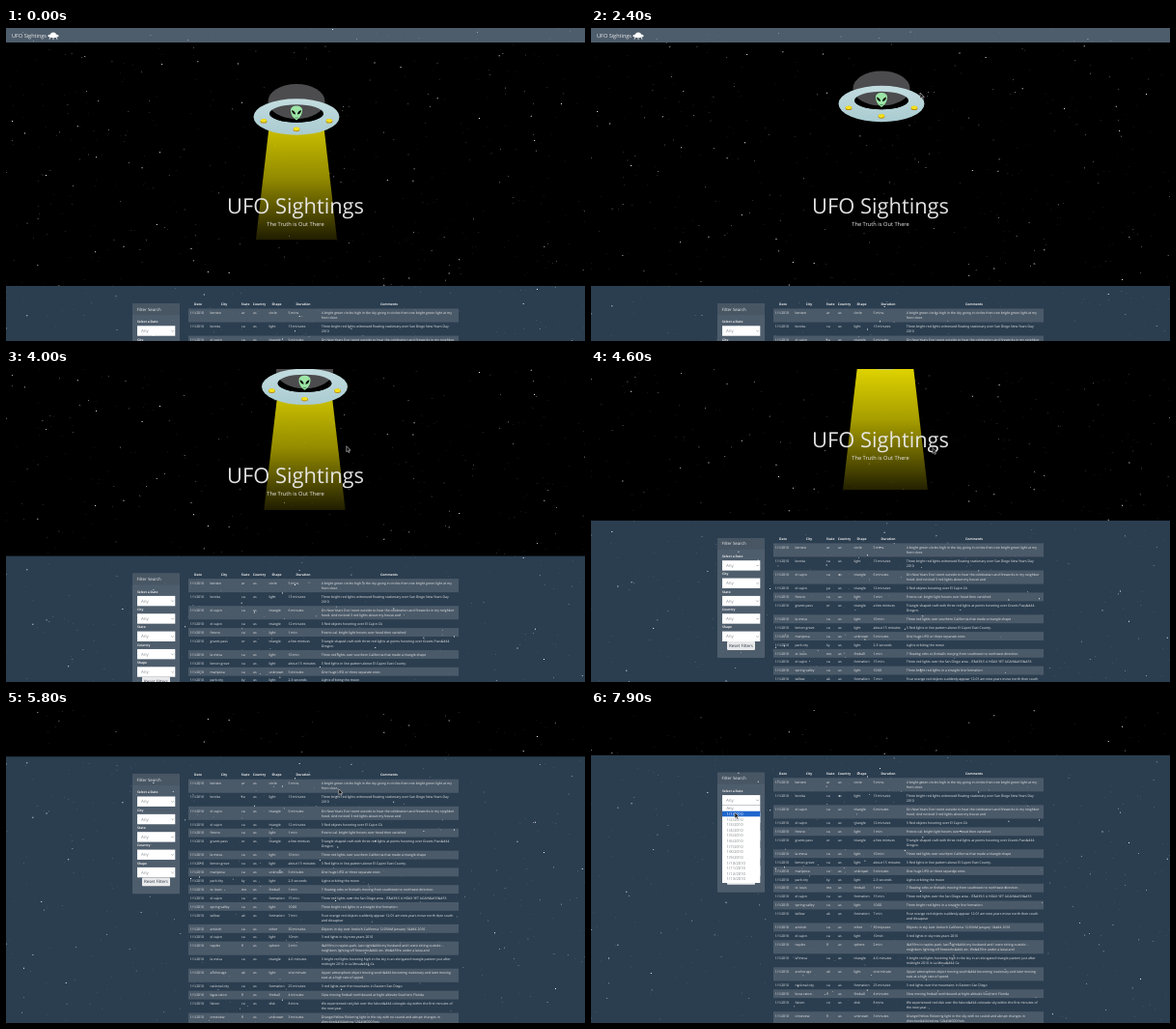
Animation of 600 by 324 pixels, one loop 8000 ms. Source, as an HTML page:

```html
<!DOCTYPE html>
<html lang="en">
<head>
<meta charset="utf-8">
<title>UFO Sightings</title>
<style>
html, body { margin: 0; width: 100%; height: 100%; overflow: hidden; background: #2b3e50; }
svg { display: block; width: 100vw; height: 100vh; }
text { font-family: "Open Sans", "Noto Sans", sans-serif; fill: #ebebeb; text-rendering: geometricPrecision; white-space: pre; }
</style>
</head>
<body>
<svg id="stage" viewBox="0 0 600 324" xmlns="http://www.w3.org/2000/svg">
  <defs>
    <linearGradient id="glow" x1="0" y1="0" x2="0" y2="1">
      <stop offset="0" stop-color="#e6da00"/>
      <stop offset=".45" stop-color="#b0a600" stop-opacity=".95"/>
      <stop offset="1" stop-color="#b0a400" stop-opacity=".2"/>
    </linearGradient>
    <linearGradient id="metal" x1="0" y1="0" x2="0" y2="1">
      <stop offset="0" stop-color="#c3dde0"/>
      <stop offset="1" stop-color="#a9cbd0"/>
    </linearGradient>
  </defs>
  <g id="page">
    <rect y="15" width="600" height="252"/>
    <g id="nav">
      <rect width="600" height="15" fill="#4e5d6c"/>
      <text x="6" y="10" font-size="5.55">UFO Sightings</text>
      <g fill="#fff">
        <ellipse cx="49" cy="8.2" rx="5.6" ry="1.9"/>
        <path d="M46 7a3 2.6 0 0 1 6 0z"/>
        <path d="M46 9.5l-1 2.2M49 10v2.2M52 9.5l1 2.2" stroke="#fff" stroke-width=".8"/>
      </g>
    </g>
    <g id="table"></g>
    <g id="filters"></g>
    <g id="stars" fill="#fff"></g>
    <path id="beam" fill="url(#glow)"/>
    <g id="ufo">
      <ellipse cy="-3.5" rx="28" ry="9.2"/>
      <ellipse cy="-16" rx="29.5" ry="18" fill="#4c4c4e"/>
      <path fill="url(#metal)" fill-rule="evenodd"
        d="M-44.5 0a44.5 18.7 0 1 1 89 0a44.5 18.7 0 1 1-89 0zM-28-3.5a28 9.2 0 1 0 56 0a28 9.2 0 1 0-56 0z"/>
      <path d="M-28-3.5a28 9.2 0 0 0 56 0q-7 5.5-28 5.5t-28-5.5z"/>
      <g id="alien">
        <path d="M0 3.4C-4.5 1-6.2-4-6-7.4C-5.6-13 5.6-13 6-7.4C6.2-4 4.5 1 0 3.4z" fill="#9ce5a6"/>
        <path d="M-4.9-7q3.8 1 3.9 4.6q-3.6-.6-3.9-4.6zM4.9-7q-3.8 1-3.9 4.6q3.6-.6 3.9-4.6z"/>
        <path d="M-1.6 1h3.2" stroke="#245c30" stroke-width=".6"/>
      </g>
      <g id="lights"></g>
    </g>
    <g text-anchor="middle">
      <text x="300" y="191.5" font-size="21.9" opacity=".96">UFO Sightings</text>
      <text x="300" y="204.6" font-size="5.73">The Truth is Out There</text>
    </g>
    <g id="menu"></g>
  </g>
  <path id="cursor" d="M0 0v6l1.4-1.2 1 2.1 1-.5-1-2h1.9z" fill="#111" stroke="#ddd" stroke-width=".55"/>
</svg>
<script>
const $ = id => document.getElementById(id);
const LOOP = 8000;

function add(parent, tag, attrs, text) {
  const el = document.createElementNS('http://www.w3.org/2000/svg', tag);
  for (const key in attrs) el.setAttribute(key, attrs[key]);
  if (text !== undefined) el.textContent = text;
  parent.append(el);
  return el;
}
const rect = (parent, x, y, width, height, fill, rx = 0) =>
  add(parent, 'rect', { x, y, width, height, fill, rx });
// y is the vertical middle of the lowercase letters
const label = (parent, x, y, size, text, more) =>
  add(parent, 'text', { x, y: y + size * .35, 'font-size': size, ...more }, text);

// city|state|shape|duration|comment line|second comment line
const sightings = `benton|ar|circle|5 mins.|4 bright green circles high in the sky going in circles then one bright green light at my|front door.
bonita|ca|light|13 minutes|Three bright red lights witnessed floating stationary over San Diego New Years Day|2010
el cajon|ca|triangle|6 minutes|On New Years Eve I went outside to hear the celebration and fireworks in my neighbor|hood. And noticed 3 red lights above my house and
el cajon|ca|triangle|12 minutes|3 Red objects hovering over El Cajon CA
fresno|ca|light|1 min|Fresno cal. bright light hovers over head then vanished
grants pass|or|triangle|a few mintues|Triangle shaped craft with three red lights at points hovering over Grants Pass&#44|Oregon.
la mesa|ca|light|10 min|Three red lights over southern California that made a triangle shape
lemon grove|ca|light|about 15 minutes|3 Red lights in line pattern above El Cajon/ East County.
mariposa|ca|unknown|5 minutes|One huge UFO or three separate ones
park city|ky|light|2-3 seconds|Lights orbiting the moon
st. louis|mo|fireball|1 min|7 floating orbs or fireballs moving from southwest to northeast direction.
el cajon|ca|formation|15 min.|Three red lights over the San Diego area - IT&#39;S A HOAX YET AGAIN&#33&#33
spring valley|ca|light|10:00|Three bright red lights in a straight line formation
willow|ak|formation|7 min|Four orange red objects suddenly appear 12:01 am new years move north then south|and dissapear
antioch|ca|other|30 minutes|Objects in sky over Antioch California 12:03AM January 1&#44 2010
el cajon|ca|light|10min|3 red lights in sky new years 2010
naples|fl|sphere|2 min|I&#39m in naples park- last night&#44 my husband and I were sitting outside --|neighbors lighting off fireworks&#44 etc. We&#39re under a lanai and
la mesa|ca|triangle|4-6 minutes|3 bright red lights hovering high in the sky in an elongated triangle pattern just after|midnight 2010 in La Mesa&#44 Ca
anchorage|ak|light|one minute|Upper atmosphere object moving south&#44 becoming stationary and later moving|east at a high rate of speed.
national city|ca|formation|25 minutes|3 red lights over the mountains in Eastern San Diego
boca raton|fl|fireball|4 minutes|Slow moving fireball northbound at hight altitude Southern Florida
falcon|co|disk|8 mins|We experienced red disk over the falcon&#44 colorado sky within the first minutes of|the new year.
crestview|fl|unknown|3 minutes|Orange/Yellow flickering light in the sky with no sound and abrupt changes in|direction&#44 below 12&#44000 feet.`;

function buildTable() {
  const table = $('table');
  const heads = { Date: 199, City: 226, State: 248, Country: 262.5, Shape: 280.5, Duration: 308, Comments: 397 };
  for (const name in heads)
    label(table, heads[name], 286, 3.35, name, { 'text-anchor': 'middle', 'font-weight': 700 });
  let top = 290.5;
  sightings.split('\n').forEach((line, i) => {
    const [city, state, shape, duration, comment, rest] = line.split('|');
    const height = rest ? 14.05 : 8.88;
    if (i % 2 === 0) rect(table, 189, top, 280, height, '#4b5a69');
    const cells = { 190.7: '1/1/2010', 211.5: city, 244: state, 256: 'us', 272.5: shape, 292.5: duration, 326.8: comment };
    for (const x in cells) label(table, +x, top + 4.5, 3.45, cells[x]);
    if (rest) label(table, 326.8, top + 9.5, 3.45, rest);
    top += height;
  });
}

function buildFilters() {
  const box = $('filters');
  rect(box, 131, 285, 49, 124, '#4e5d6c', .8);
  rect(box, 131, 285, 49, 12, '#485664', .8);
  label(box, 135.5, 291, 4.4, 'Filter Search');
  ['Select a Date', 'City', 'State', 'Country', 'Shape'].forEach((name, i) => {
    const y = 304 + i * 18.35;
    label(box, 136, y, 3.3, name, { 'font-weight': 700 });
    rect(box, 136, y + 4.3, 39.3, 10.4, '#fff');
    label(box, 140, y + 9.6, 4.5, 'Any', { style: 'fill:#8b8f94' });
    add(box, 'path', { d: `M171.4 ${y + 9}l1.2 1.2 1.2-1.2`, fill: 'none', stroke: '#666', 'stroke-width': .5 });
  });
  rect(box, 141, 392.2, 29, 8.8, '#e9eaec', .8);
  label(box, 155.5, 396.6, 4.4, 'Reset Filters', { 'text-anchor': 'middle', style: 'fill:#2b3440' });
}

const MENU_TOP = 318.9, ITEM = 5.62;
let menuBar, menuItems;
function buildMenu() {
  const menu = $('menu');
  rect(menu, 136, MENU_TOP, 39.3, ITEM * 14 + 1.6, '#fff');
  menuBar = rect(menu, 136, MENU_TOP, 39.3, ITEM, '#1f66cc');
  menuItems = Array.from({ length: 14 }, (_, i) =>
    label(menu, 140.5, MENU_TOP + ITEM * (i + .5) + .4, 4.1, i ? `1/${i}/2010` : 'Any'));
}

let seed = 11;
const random = () => (seed = seed * 16807 % 2147483647) / 2147483647;
const TILE = 625;
let starLayers;
function buildStars() {
  const specs = [[700, .31, 12.5], [200, .62, 6.25], [100, .94, 4.17]];
  starLayers = specs.map(([count, size, speed]) => {
    let d = '';
    for (let i = 0; i < count; i++)
      d += `M${(random() * TILE).toFixed(1)} ${(random() * TILE).toFixed(1)}h${size}v${size}h-${size}z`;
    const layer = add($('stars'), 'g', {});
    add(layer, 'path', { d });
    add(layer, 'path', { d, transform: `translate(0 ${TILE})` });
    return { layer, speed };
  });
}

function buildLights() {
  for (const [x, y] of [[-34, 3.8], [0, 12.4], [34, 3.8]]) {
    add($('lights'), 'ellipse', { cx: x, cy: y + .6, rx: 3.4, ry: 2.2, fill: '#b58a14' });
    add($('lights'), 'ellipse', { cx: x, cy: y, rx: 3.1, ry: 1.8, fill: '#f4e11c' });
  }
}

const clamp = u => Math.max(0, Math.min(1, u));
const smooth = u => u * u * (3 - 2 * u);
// keys: [time, ...values], eased between neighbours
function track(keys, t) {
  const next = keys.findIndex(key => key[0] > t);
  if (next < 0) return keys[keys.length - 1].slice(1);
  if (next === 0) return keys[0].slice(1);
  const a = keys[next - 1], b = keys[next];
  const u = smooth((t - a[0]) / (b[0] - a[0]));
  return a.slice(1).map((v, i) => v + (b[i + 1] - v) * u);
}

const ufoKeys = [[0, 301, 92], [2400, 301, 78.5], [3400, 314, 91.5], [4600, 305, 92], [5000, 301, 92]];
const beamKeys = [[0, .88], [400, 0], [2800, 0], [3400, .73], [4500, 1], [4800, 1], [5200, 0]];
const cursorKeys = [[1300, 420, 150], [2200, 341, 67], [2500, 341, 67], [3200, 350, 76], [3500, 350, 76],
  [4300, 354, 81.5], [5700, 354, 81], [6500, 143, 95], [7300, 143, 95], [7600, 149, 106]];
const wheelTimes = [2640, 3700, 4250, 4750, 5130, 5600];

const scrollAt = t => wheelTimes.reduce((sum, start) =>
  sum + 36.7 * (1 - (1 - clamp((t - start) / 250)) ** 2), 0);
const move = (el, x, y) => el.setAttribute('transform', `translate(${x.toFixed(2)} ${y.toFixed(2)})`);
const show = (el, on) => el.setAttribute('visibility', on ? 'visible' : 'hidden');

function draw(t) {
  move($('page'), 0, -scrollAt(t));
  for (const { layer, speed } of starLayers) move(layer, 0, -speed * t / 1000);

  const [x, y] = track(ufoKeys, t);
  move($('ufo'), x, y);
  const [power] = track(beamKeys, t);
  const length = 132 * power, half = 28.5 + length * .117, top = y + 11;
  $('beam').setAttribute('d', `M${x - 28.5} ${top}h57L${x + half} ${top + length}h${-2 * half}z`);
  $('beam').setAttribute('opacity', power);

  show($('menu'), t >= 7100);
  const active = t >= 7450 ? 1 : 0;
  menuBar.setAttribute('y', MENU_TOP + ITEM * active + .4);
  menuItems.forEach((item, i) => item.style.fill = i === active ? '#fff' : '#7d8084');

  show($('cursor'), t >= 1300);
  move($('cursor'), ...track(cursorKeys, t));
}

buildTable();
buildFilters();
buildMenu();
buildStars();
buildLights();
const begin = performance.now();
function tick() {
  draw((performance.now() - begin) % LOOP);
  requestAnimationFrame(tick);
}
tick();
</script>
</body>
</html>
```
